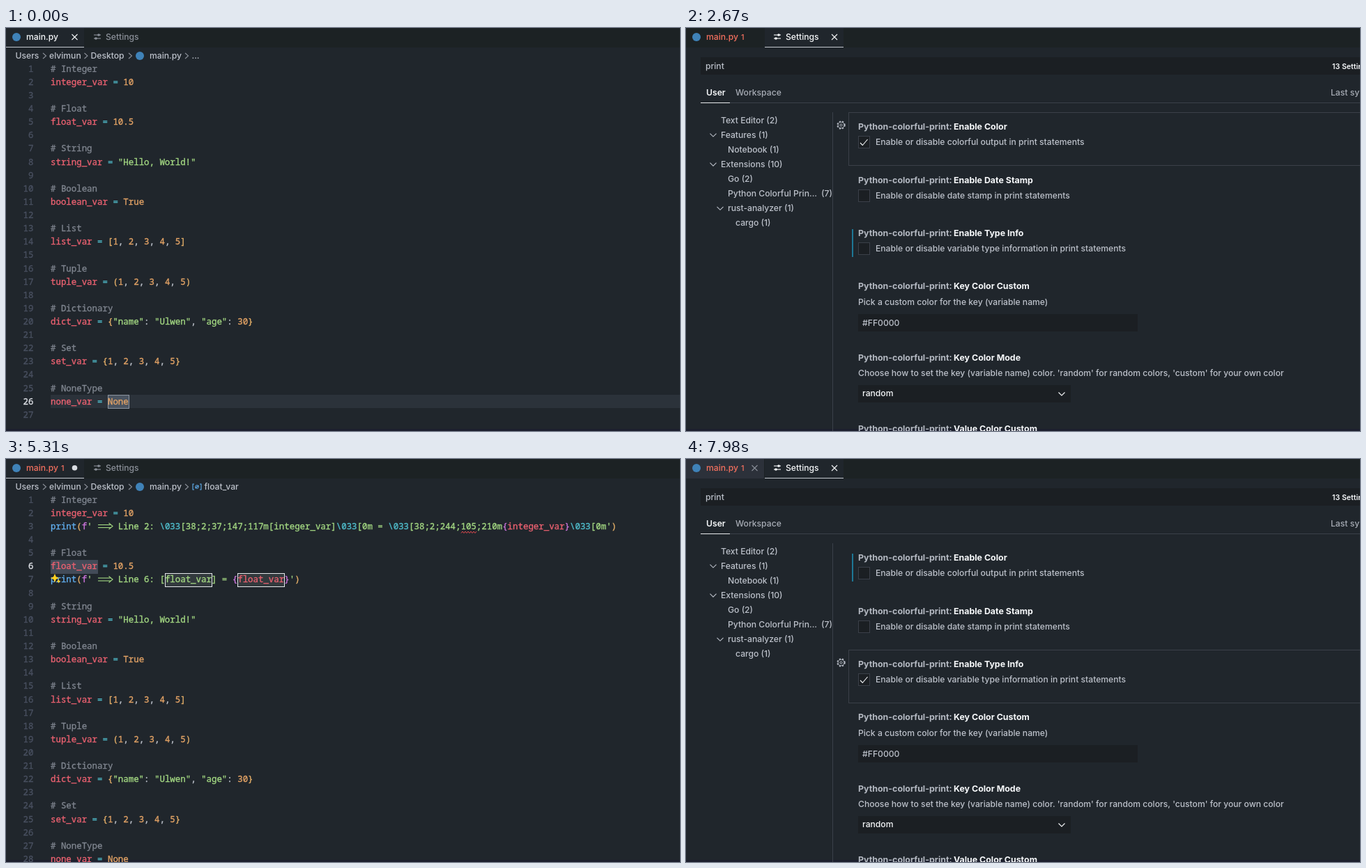
Animation of 967 by 579 pixels, one loop 8000 ms. Source, as an HTML page with a canvas:

```html
<!DOCTYPE html>
<html lang="en">
<head>
<meta charset="utf-8">
<style>
  html, body { margin: 0; width: 100%; height: 100%; overflow: hidden; background: #20262c; }
  canvas { display: block; }
</style>
</head>
<body>
<canvas id="stage" width="967" height="579"></canvas>
<script>
const ctx = document.getElementById('stage').getContext('2d');
const W = 967, H = 579, LOOP = 8000;
const CHAR = 7.45, LEFT = 64, TOP = 58.3, LINE = 19.12;

const BG = '#20262c', DARK = '#1b1f23', BAR = '#1c2224', WHITE = '#f6f8fa';
const TEXT = '#bcc1ca', DIM = '#8b9099', ERROR = '#f4705f', LOGO = '#3f82b8', EDGE = '#3b4049';
const RED = '#ea6170', CYAN = '#4fbccb', ORANGE = '#e2a265', GREEN = '#a3d882',
      GOLD = '#e3ae68', PURPLE = '#cb74dc', BLUE = '#61afef', COMMENT = '#7f858f';

const UI = 'Inter, sans-serif', MONO = '"Noto Sans Mono", "DejaVu Sans Mono", monospace';
const REGULAR = '500 12.15px ' + UI, BOLD = '700 12.4px ' + UI, CODE = '12.42px ' + MONO;

const variables = [
  ['Integer', 'integer_var = 10'],
  ['Float', 'float_var = 10.5'],
  ['String', 'string_var = "Hello, World!"'],
  ['Boolean', 'boolean_var = True'],
  ['List', 'list_var = [1, 2, 3, 4, 5]'],
  ['Tuple', 'tuple_var = (1, 2, 3, 4, 5)'],
  ['Dictionary', 'dict_var = {"name": "Ulwen", "age": 30}'],
  ['Set', 'set_var = {1, 2, 3, 4, 5}'],
  ['NoneType', 'none_var = None'],
];
const printInteger = String.raw`print(f' ==> Line 2: \033[38;2;37;147;117m[integer_var]\033[0m = \033[38;2;244;105;210m{integer_var}\033[0m')`;
const printFloat = `print(f' ==> Line 6: [float_var] = {float_var}')`;

const between = (t, a, b) => t >= a && t < b;

function rect(x, y, w, h, color) {
  ctx.fillStyle = color;
  ctx.fillRect(x, y, w, h);
}
function frame(x, y, w, h, color) {
  ctx.lineWidth = 1;
  ctx.strokeStyle = color;
  ctx.strokeRect(x + .5, y + .5, w - 1, h - 1);
}
function text(str, x, y, color = TEXT, font = REGULAR, align = 'left') {
  ctx.font = font;
  ctx.textAlign = align;
  ctx.fillStyle = color;
  ctx.fillText(str, x, y + 4.4);
}
// Code is drawn slightly heavier than the regular weight.
function codeText(str, x, y, color, align) {
  text(str, x, y, color, CODE, align);
  ctx.strokeStyle = color;
  ctx.lineWidth = .35;
  ctx.strokeText(str, x, y + 4.4);
}
function path(points, color, width = 1.1) {
  ctx.beginPath();
  points.forEach(([x, y]) => ctx.lineTo(x, y));
  ctx.strokeStyle = color;
  ctx.lineWidth = width;
  ctx.stroke();
}
function disc(x, y, r, color) {
  ctx.beginPath();
  ctx.arc(x, y, r, 0, 7);
  ctx.fillStyle = color;
  ctx.fill();
}
function ring(x, y, r, color, width = 1) {
  ctx.beginPath();
  ctx.arc(x, y, r, 0, 7);
  ctx.strokeStyle = color;
  ctx.lineWidth = width;
  ctx.stroke();
}
function cross(x, y, color) {
  path([[x - 4, y - 4], [x + 4, y + 4]], color);
  path([[x + 4, y - 4], [x - 4, y + 4]], color);
}
const chevronRight = (x, y, color = DIM) => path([[x - 2, y - 4], [x + 2.5, y], [x - 2, y + 4]], color);
const chevronDown = (x, y, color = TEXT) => path([[x - 4.5, y - 2], [x, y + 2.5], [x + 4.5, y - 2]], color);

function tabs(s) {
  rect(0, 0, W, 28, BAR);
  const [start, width] = s.settings ? [113, 113] : [0, 112];
  if (s.hover) rect(0, 0, 112, 28, '#2c313a');
  rect(start, 0, width, 28, BG);
  rect(start, 27, width, 1, '#c3c7ce');

  disc(15, 13, 6, LOGO);
  text('main.py', 29, 12.5, s.error ? ERROR : WHITE);
  if (s.error) text('1', 79, 12.5, ERROR, '500 11px ' + UI);
  const mark = s.settings ? DIM : WHITE;
  if (s.dirty && !s.hover) disc(98.5, 12.8, 3.8, s.settings ? DIM : '#d9dce1');
  else if (!s.settings || s.hover) cross(98.5, 13, mark);

  const color = s.settings ? WHITE : DIM;
  path([[126, 10], [136, 10]], color);
  path([[126, 15], [136, 15]], color);
  disc(133, 10, 1.8, color);
  disc(129, 15, 1.8, color);
  text('Settings', 143, 12.5, color);
  if (s.settings) cross(213, 13, WHITE);
}

function breadcrumb(symbol) {
  const y = 40;
  text('Users', 13.5, y);
  text('elvimun', 62, y);
  text('Desktop', 121.5, y);
  text('main.py', 206, y);
  [55, 114.5, 178, 259].forEach(x => chevronRight(x, y));
  disc(192, y, 6, LOGO);
  if (!symbol) return text('...', 266.5, y);
  path([[270, 36], [268, 36], [268, 44], [270, 44]], BLUE);
  path([[278, 36], [280, 36], [280, 44], [278, 44]], BLUE);
  ring(274, 40, 2.3, BLUE);
  path([[271.5, 42], [276.5, 38]], BLUE);
  text(symbol, 284.5, y);
}

function colorOf(token, isPrint, col) {
  if (isPrint) {
    if (token === 'print') return BLUE;
    if (token === 'f') return PURPLE;
    if (/^[()]$/.test(token)) return GOLD;
    if (/^[{}]$/.test(token)) return PURPLE;
    if (token[0] === '\\') return CYAN;
    return GREEN;
  }
  if (token[0] === '#') return COMMENT;
  if (token[0] === '"') return GREEN;
  if (token === '=') return CYAN;
  if (/^[[\](){}]$/.test(token)) return GOLD;
  if (col === 0) return RED;
  return /^\w/.test(token) ? ORANGE : TEXT;
}
function codeLine(line, y) {
  const isPrint = line.startsWith('print');
  const tokens = isPrint
    ? /^print|[(){}]|f(?=')|\\033|==>|\w+_var|[^(){}\\=>_]+?(?=\\|==>|\w+_var|[(){}])|./g
    : /#.*|".*?"|[\w.]+|[^\s]/g;
  for (const { 0: token, index } of line.matchAll(tokens)) {
    const x = LEFT + index * CHAR;
    if (token === '==>') {
      path([[x + 1, y - 2], [x + 19, y - 2]], GREEN);
      path([[x + 1, y + 2], [x + 19, y + 2]], GREEN);
      path([[x + 16.5, y - 4.5], [x + 22, y], [x + 16.5, y + 4.5]], GREEN);
      continue;
    }
    const inBraces = isPrint && line[index - 1] === '{';
    codeText(token, x, y, inBraces ? RED : colorOf(token, isPrint, index));
  }
}

function sparkle(x, y) {
  const star = (cx, cy, r) => {
    ctx.beginPath();
    for (let i = 0; i < 8; i++) {
      const a = i * Math.PI / 4, d = i % 2 ? r * .42 : r;
      ctx.lineTo(cx + d * Math.sin(a), cy - d * Math.cos(a));
    }
    ctx.fillStyle = '#ffd21f';
    ctx.fill();
  };
  star(x, y, 6.2);
  star(x + 5.5, y + 4.5, 3);
}

function editor(s) {
  const lines = variables.flatMap(([type, code]) => ['# ' + type, code, '']);
  if (s.printed > 0) lines.splice(2, 0, printInteger);
  if (s.printed > 1) lines.splice(6, 0, printFloat);
  const yOf = row => TOP + row * LINE;
  const highlight = (row, col, length, fill, border) => {
    const x = Math.round(LEFT + col * CHAR), y = Math.round(yOf(row) - 9), w = Math.round(length * CHAR) + 1;
    rect(x, y, w, 20, fill);
    if (border) frame(x, y, w, 20, border);
  };

  breadcrumb(s.symbol);
  if (s.word) {
    highlight(s.row, 0, s.word.length, s.marks === 'dim' ? '#363c46' : '#434b58');
    if (s.marks) {
      const line = lines[s.row + 1];
      for (const { index } of line.matchAll(s.word)) {
        if (s.marks === 'dim') highlight(s.row + 1, index, s.word.length, '#2e3439');
        else highlight(s.row + 1, index, s.word.length, '#32393d', '#e4e7ea');
      }
    }
  } else {
    rect(LEFT, 527, W - LEFT, 19, '#2b323a');
    highlight(25, 11, 4, '#4a5461', '#8b949f');
  }

  lines.forEach((line, row) => {
    codeText(row + 1, 39.5, yOf(row), row === s.row ? '#e1e4e9' : '#495060', 'right');
    codeLine(line, yOf(row));
  });
  if (s.squiggle) {
    const wave = Array.from({ length: 12 }, (_, i) => [653 + i * 2, i % 2 ? 104 : 106.5]);
    path(wave, '#e0484d', 1);
  }
  if (s.sparkle) sparkle(70, yOf(s.row + 1) - 2);
}

function gear(y) {
  ctx.setLineDash([2.2, 2.2]);
  ring(222.5, y, 5.4, TEXT, 1.5);
  ctx.setLineDash([]);
  ring(222.5, y, 4.4, TEXT);
  ring(222.5, y, 1.6, TEXT);
}
function title(name, y) {
  text('Python-colorful-print:', 247, y, '#b4b9c2', BOLD);
  text(name, 384, y, WHITE, BOLD);
}

function settings(s) {
  rect(21, 42, W - 21, 25, DARK);
  text('print', 28, 55);
  text('13 Settings Found', 927, 55, WHITE, '600 10.6px ' + UI);
  text('User', 29, 92.5, WHITE, '600 12.2px ' + UI);
  text('Workspace', 71, 92.5, '#a8adb6');
  text('Last synced: 1 min ago', 925, 92.5, '#a8adb6');
  rect(21, 107, W - 21, 1, EDGE);
  rect(21, 107, 42, 1, '#e8eaed');
  rect(210, 121, 1, H - 121, EDGE);

  const tree = [
    [50, 'Text Editor (2)'], [50, 'Features (1)', 1], [60, 'Notebook (1)'], [50, 'Extensions (10)', 1],
    [60, 'Go (2)'], [60, 'Python Colorful Prin...'], [60, 'rust-analyzer (1)', 1], [71, 'cargo (1)'],
  ];
  tree.forEach(([x, label, open], i) => {
    const y = 132.5 + i * 21.05;
    text(label, x, y);
    if (open) chevronDown(x - 11, y);
  });
  text('(7)', 194, 237.7);

  const options = [
    ['Enable Color', 'colorful output'],
    ['Enable Date Stamp', 'date stamp'],
    ['Enable Type Info', 'variable type information'],
  ];
  options.forEach(([name, what], i) => {
    const y = 142 + i * 76.5;
    if (s.focus === i) frame(233, Math.round(y - 21), W, 77, EDGE);
    if (s.gear === i) gear(y - 2.5);
    if (s.modified[i]) rect(238, Math.round(y - 6), 2, 40, '#1d7795');
    title(name, y);
    const top = Math.round(y + 13);
    rect(247, top, 17, 18, DARK);
    frame(247, top, 17, 18, EDGE);
    if (s.checked[i]) path([[250, y + 23], [253.3, y + 26.5], [260.5, y + 18]], WHITE, 1.1);
    text(`Enable or disable ${what} in print statements`, 272, y + 22);
  });

  title('Key Color Custom', 371);
  text('Pick a custom color for the key (variable name)', 247, 393.5);
  rect(247, 411, 401, 25, DARK);
  text('#FF0000', 253, 424);
  title('Key Color Mode', 473.5);
  text("Choose how to set the key (variable name) color. 'random' for random colors, 'custom' for your own color", 247, 495.5);
  rect(247, 513, 305, 25, DARK);
  text('random', 253, 525, WHITE);
  chevronDown(539, 525.5, WHITE);
  title('Value Color Custom', 575.5);
}

function stateAt(t) {
  const onInteger = between(t, 480, 4230);
  return {
    settings: between(t, 2160, 3750) || t >= 6090,
    hover: between(t, 3480, 3750) || t >= 7980,
    dirty: between(t, 1050, 1890) || t >= 4800,
    error: t >= 1890,
    printed: (t >= 1050) + (t >= 4800),
    row: t < 480 ? 25 : onInteger ? 1 : 5,
    word: t < 480 ? '' : onInteger ? 'integer_var' : 'float_var',
    symbol: t < 700 ? '' : t < 4450 ? 'integer_var' : 'float_var',
    marks: between(t, 3750, 4230) ? 'dim' : between(t, 1260, 3750) || t >= 5040 ? 'box' : '',
    sparkle: between(t, 1260, 1890) || t >= 5040,
    squiggle: t >= 3750,
    focus: t < 3750 ? 0 : t < 7410 ? -1 : 2,
    gear: between(t, 2580, 3480) || between(t, 6090, 7410) ? 0 : t >= 7410 ? 2 : -1,
    checked: [t < 3060, false, t >= 7410],
    modified: [t >= 3270, false, t < 7620],
  };
}

function draw() {
  const s = stateAt(performance.now() % LOOP);
  rect(0, 0, W, H, BG);
  rect(0, 576, W, 3, '#1c1f2e');
  tabs(s);
  (s.settings ? settings : editor)(s);
  requestAnimationFrame(draw);
}
draw();
</script>
</body>
</html>
```
